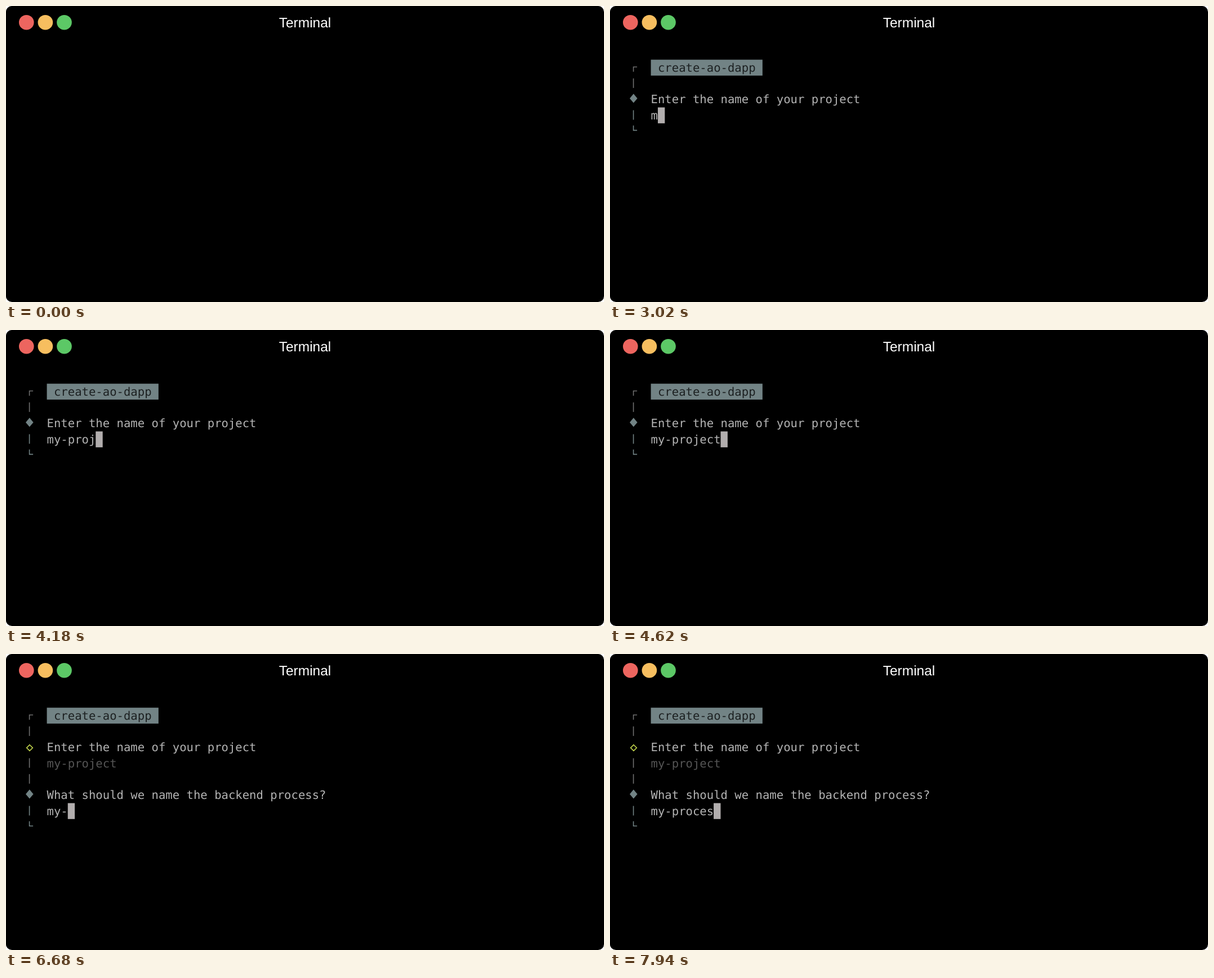
These frames come from a looping animation (1062 by 527 pixels, 8 s). An HTML page:

```html
<!DOCTYPE html>
<html lang="en">
<head>
<meta charset="utf-8">
<title>Terminal</title>
<style>
html, body { margin: 0; width: 100%; height: 100%; overflow: hidden; background: #fff; }
svg { display: block; width: 100%; height: 100%; }
text { text-rendering: geometricPrecision; }
#title { font: 24.5px "Liberation Sans", Arial, sans-serif; fill: #fff; text-anchor: middle; }
#screen { font: 20.6px "DejaVu Sans Mono", monospace; }
</style>
</head>
<body>
<svg viewBox="0 0 1062 527">
  <rect width="1062" height="527" rx="10.6"/>
  <circle cx="36.3" cy="29.2" r="13.3" fill="#ed655f"/>
  <circle cx="69.9" cy="29.2" r="13.3" fill="#f7be5f"/>
  <circle cx="103.5" cy="29.2" r="13.3" fill="#5cc866"/>
  <text id="title" x="531" y="38">Terminal</text>
  <g id="screen"></g>
</svg>
<script>
const LOOP = 8000, CELL = 12.39, ROW = 28.32, LEFT = 72.57, TOP = 95.58;
const TEXT = '#b4b4b4', DIM = '#555', RAIL = '#707070', ACCENT = '#728385', CURSOR = '#b2aeae';

const prompts = [
  { start: 1020, end: 5710, row: 2, label: 'Enter the name of your project',
    hint: 'sparkling-solid', answer: 'my-project',
    keys: [3020, 3170, 3280, 3470, 3580, 3730, 4180, 4300, 4430, 4620] },
  { start: 5710, end: LOOP, row: 5, label: 'What should we name the backend process?',
    hint: 'my-process', answer: 'my-process',
    keys: [6350, 6490, 6680, 6890, 7030, 7140, 7590, 7730, 7940] }
];

const rowY = row => TOP + row * ROW;
const write = (str, col, row, color) =>
  `<text x="${LEFT + col * CELL}" y="${Math.round(rowY(row) + 21)}" fill="${color}">${str}</text>`;
const block = (col, row, cells, color) =>
  `<rect x="${LEFT + col * CELL}" y="${rowY(row)}" width="${cells * CELL}" height="${ROW}" fill="${color}"/>`;
const line = (d, color) => `<path d="${d}" fill="none" stroke="${color}" stroke-width="1.6"/>`;
const bar = (row, color) => line(`M41.6 ${rowY(row) + 5}v17`, color);
const corner = (row, color) => line(`M41.6 ${rowY(row) + 4}v8.5h6.5`, color);

function header() {
  return line('M41.6 117v-8.5h6.5', RAIL) + block(0, 0, 16, ACCENT) +
    write('create-ao-dapp', 1, 0, '#1c2021') + bar(1, RAIL);
}

function prompt(p, t) {
  const { row } = p, label = write(p.label, 0, row, TEXT), y = rowY(row);
  if (t >= p.end) {
    return label + line(`M42 ${y + 9.5}l5.3 5.3-5.3 5.3-5.3-5.3z`, '#c5d84e') +
      bar(row + 1, RAIL) + bar(row + 2, RAIL) + write(p.answer, 0, row + 1, DIM);
  }
  const typed = p.keys.filter(k => t >= k).length;
  const input = typed
    ? write(p.answer.slice(0, typed), 0, row + 1, TEXT)
    : write(p.hint.slice(1), 1, row + 1, DIM);
  return label + `<path d="M41.8 ${y + 4}l6.8 8.2-6.8 8.2-6.8-8.2z" fill="${ACCENT}"/>` +
    bar(row + 1, ACCENT) + corner(row + 2, ACCENT) + input + block(typed, row + 1, 1, CURSOR);
}

const screen = document.getElementById('screen');
let shown = '';
function draw(now) {
  const t = now % LOOP;
  const html = (t < 1000 ? '' : header()) +
    prompts.filter(p => t >= p.start).map(p => prompt(p, t)).join('');
  if (html !== shown) screen.innerHTML = shown = html;
  requestAnimationFrame(draw);
}
draw(0);
</script>
</body>
</html>
```
